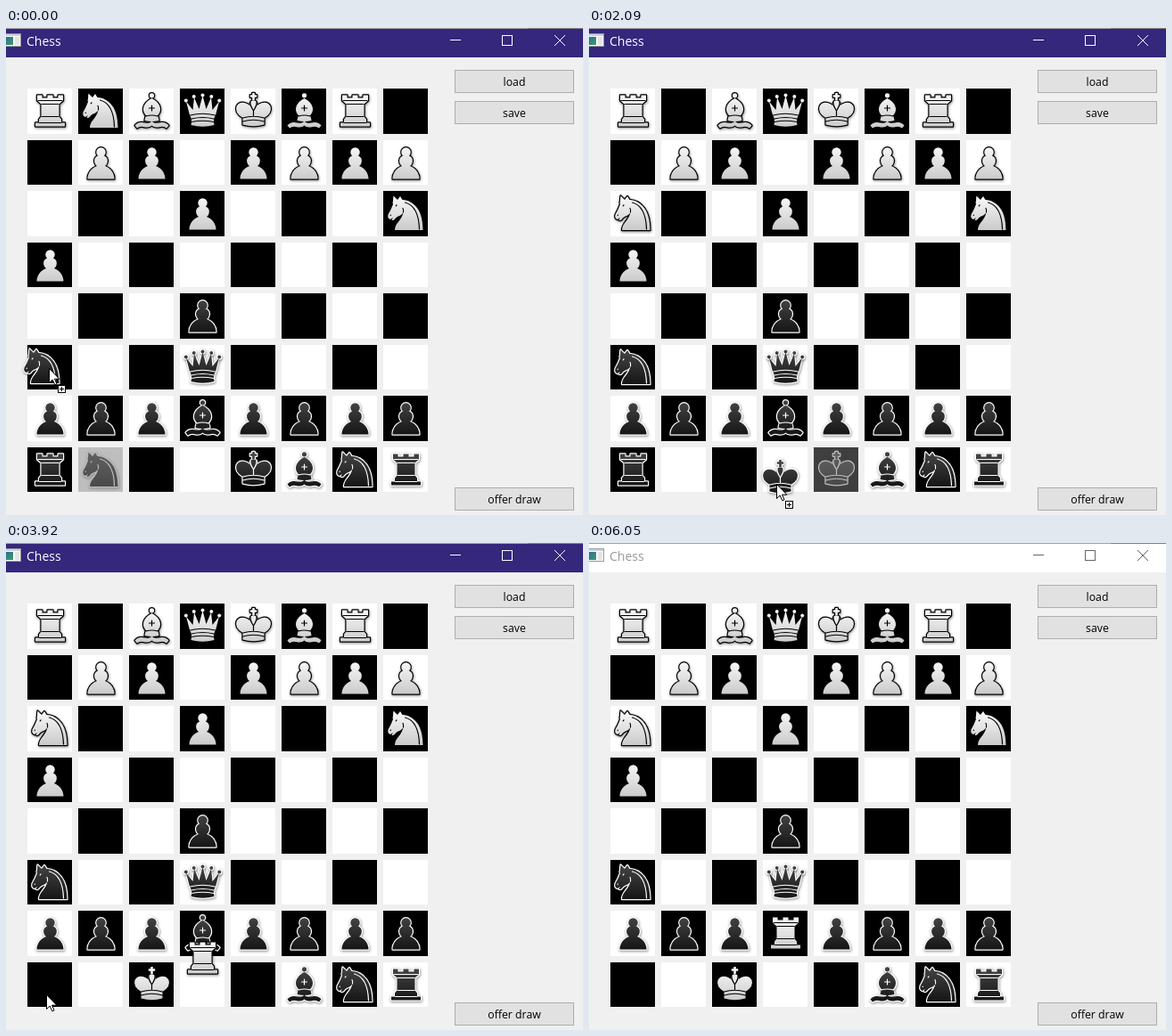
These frames come from a looping animation (647x547 px, 6.15 s). An HTML page with a canvas:

```html
<!DOCTYPE html>
<html lang="en">
<head>
<meta charset="utf-8">
<title>Chess</title>
<style>
  html, body { margin: 0; width: 100%; height: 100%; overflow: hidden; background: #f0f0f0; }
  canvas { display: block; }
</style>
</head>
<body>
<canvas id="stage" width="647" height="547"></canvas>
<script>
const ctx = document.getElementById('stage').getContext('2d');
const LOOP = 6150;

// Screen updates: time and, when the pointer moves, its new position.
const STEPS = [
  [0, 48, 382], [130, 49, 382], [380, 49, 381], [530], [680], [800, 53, 381],
  [950, 54, 392], [1080, 62, 435], [1200, 85, 501], [1350, 187, 488],
  [1510, 242, 478], [1660, 272, 506], [1940, 273, 503], [2090, 210, 512],
  [2220, 127, 518], [2370, 93, 507], [2510, 60, 508], [2630, 45, 508],
  [3440, 45, 507], [3560], [3680], [3800], [3920], [4080, 48, 507],
  [4220, 110, 505], [4340, 220, 503], [4470, 342, 505], [4610, 440, 501],
  [4730, 502, 506], [4890, 548, 530], [5030, 556, 541], [5160, -99, -99], [6050]
];

const START = [
  'R.BQKBR.', '.PP.PPPP', '...P...N', 'P.......',
  '...p....', '...q....', 'pppbpppp', 'r....bnr'
];

// Pieces in cell pixels: solid shapes and the lines drawn inside them.
const dot = (x, y, r) => `M${x - r} ${y}a${r} ${r} 0 1 0 ${2 * r} 0a${r} ${r} 0 1 0 ${-2 * r} 0z`;
const PIECES = {
  p: { solids: [
    dot(25.5, 13.5, 5.2),
    'M22 17.5C18.5 19 17.5 22 18.5 25.5Q19 27.5 21 29C15 31.5 10.5 36.5 10.5 43.5H40.5C40.5 36.5 36 31.5 30 29Q32 27.5 32.5 25.5C33.5 22 32.5 19 29 17.5z'
  ], lines: '' },
  r: { solids: [
    'M9 42.5V38.5H13V34.5L15.5 31.5V17.5L11 13.5V7.5H16.5V10.5H22.5V7.5H28.5V10.5H34.5V7.5H40V13.5L35.5 17.5V31.5L38 34.5V38.5H42V42.5z'
  ], lines: 'M12 13.5H39M16 17.5H35M16 31.5H35M13.5 38.5H37.5' },
  n: { solids: [
    'M13 44C13 36 21 33 22.5 24C21 28 15.5 28 13.5 31Q11.5 34 9.5 32.5L11 30L8 32Q4.5 31 5.5 26.5Q9 20.5 11 15Q10 13 11 11.5Q11 8 11.5 5.5L16 10L19 6L21.5 10C35 11 44.5 22 44.5 44z'
  ], lines: 'M24.5 13C34 15.5 40 25 40.5 43M22.5 24Q23 21 22 19.5M14.2 16.8l.8-.8M8.3 27v.4' },
  b: { solids: [
    'M25.5 36.5C23.5 39.5 19 39 14.5 38Q9.5 37.5 6.5 41.5L9 44.5Q12 42 16 43Q23 44.5 25.5 41.5Q28 44.5 35 43Q39 42 42 44.5L44.5 41.5Q41.5 37.5 36.5 38C32 39 27.5 39.5 25.5 36.5z',
    'M18.5 31H32.5L33.5 36Q25.5 38 17.5 36z',
    'M20 31C13.5 26 14.5 16.5 25.5 11C36.5 16.5 37.5 26 31 31z',
    dot(25.5, 7.8, 2.6)
  ], lines: 'M19 31Q25.5 29 32 31M25.5 19v6M22.5 22h6' },
  q: { solids: [
    'M11 30L7 14.5L14.5 24L16 10L21.5 23L25.5 8L29.5 23L35 10L36.5 24L44 14.5L40 30Q37 34 38.5 41Q25.5 44.5 12.5 41Q14 34 11 30z',
    dot(6.8, 13.5, 2), dot(15.7, 9, 2), dot(25.5, 7.5, 2), dot(35.3, 9, 2), dot(44.2, 13.5, 2)
  ], lines: 'M11.5 30Q25.5 26.5 39.5 30M13 34Q25.5 31 38 34M13 37.5Q25.5 35 38 37.5' },
  k: { solids: [
    'M24.2 5h2.6v2.3h2.4v2.4h-2.4v3.3h-2.6v-3.3h-2.4v-2.4h2.4z',
    'M25.5 28C22 23 20.5 18.5 22 15.5C23.5 12.5 27.5 12.5 29 15.5C30.5 18.5 29 23 25.5 28z',
    'M13.5 40.5Q25.5 44 37.5 40.5V33Q47 27 44.5 20C41.5 13.5 31.5 14 25.5 24.5C19.5 14 9.5 13.5 6.5 20Q4 27 13.5 33z'
  ], lines: 'M25.5 31V25C28 21 29.5 18 29 15.5M25.5 25C23 21 21.5 18 22 15.5M13.5 33Q25.5 29.5 37.5 33M13.5 37Q25.5 33.5 37.5 37' }
};
for (const piece of Object.values(PIECES)) {
  piece.solids = piece.solids.map(d => new Path2D(d));
  piece.lines = new Path2D(piece.lines);
}

function gradient(top, bottom) {
  const g = ctx.createLinearGradient(0, 8, 0, 44);
  g.addColorStop(0, top);
  g.addColorStop(1, bottom);
  return g;
}
const LIGHT = { fill: gradient('#f6f6f6', '#cacaca'), line: '#000' };
const DARK = { fill: gradient('#424242', '#151515'), line: '#fff' };

const ARROW = new Path2D('M.5.5V16.5L4.2 13 6.8 18.8 9 17.9 6.5 12.2H11.8Z');
const cellX = col => 24 + 57 * col;
const cellY = row => Math.round(68 + 57.57 * row);

function rect(x, y, w, h, fill, border) {
  ctx.fillStyle = fill;
  ctx.fillRect(x, y, w, h);
  if (border) {
    ctx.strokeStyle = border;
    ctx.lineWidth = 1;
    ctx.strokeRect(x + .5, y + .5, w - 1, h - 1);
  }
}

function text(str, x, y, size, color, align) {
  ctx.font = `${size}px "Open Sans", "Noto Sans", sans-serif`;
  ctx.textAlign = align;
  ctx.fillStyle = color;
  ctx.fillText(str, x, y);
}

// Upper case letters are light pieces; x, y is the corner of the piece's cell.
function drawPiece(letter, x, y) {
  const piece = PIECES[letter.toLowerCase()];
  const look = letter < 'a' ? LIGHT : DARK;
  ctx.save();
  ctx.translate(x, y);
  ctx.lineJoin = ctx.lineCap = 'round';
  ctx.strokeStyle = look.line;
  ctx.fillStyle = look.fill;
  ctx.save();
  ctx.shadowColor = 'rgba(0,0,0,.5)';
  ctx.shadowBlur = 3;
  ctx.shadowOffsetX = .5;
  ctx.shadowOffsetY = 1;
  ctx.lineWidth = 2.4;
  piece.solids.forEach(p => ctx.stroke(p));
  ctx.restore();
  piece.solids.forEach(p => ctx.fill(p));
  ctx.lineWidth = 1.2;
  ctx.stroke(piece.lines);
  ctx.restore();
}

function drawBoard() {
  for (let row = 0; row < 8; row++) {
    const y = cellY(row), height = Math.round(118.6 + 57.5 * row) - y;
    for (let col = 0; col < 8; col++) {
      rect(cellX(col), y, 50, height, (col + row) % 2 ? '#000' : '#fff');
    }
  }
}

// The cell a piece is dragged from stays visible under a grey veil.
function drawGhost(letter, col, row) {
  drawPiece(letter, cellX(col), cellY(row));
  rect(cellX(col), cellY(row), 50, 50, 'rgba(127,127,127,.5)');
}

function drawGlide(letter, from, to, progress) {
  const p = Math.min(1, Math.max(0, progress));
  const mix = (a, b) => Math.round(a + (b - a) * p);
  drawPiece(letter, mix(cellX(from[0]), cellX(to[0])), mix(cellY(from[1]), cellY(to[1])));
}

function drawTitleBar(active) {
  const ink = active ? '#fff' : '#666';
  rect(0, 0, 647, 33, active ? '#34277c' : '#fff');
  rect(0, 0, 647, 1, '#a2a2a2');
  rect(585, 0, 62, 1, '#808080');
  rect(-4, 6, 21, 15, '#fafafa', '#9a9a9a');
  rect(-4, 7, 20, 2, '#c9d3dc');
  const shade = ctx.createLinearGradient(0, 10, 8, 19);
  shade.addColorStop(0, '#2f6f9c');
  shade.addColorStop(1, '#3f9a63');
  rect(0, 10, 8, 9, shade);
  rect(10, 10, 5, 9, '#e4e4e4');
  text('Chess', 23, 20, 14, active ? '#fff' : '#999', 'left');
  rect(498, 13, 12, 1, ink);
  ctx.strokeStyle = ink;
  ctx.lineWidth = 1;
  ctx.strokeRect(556.5, 8.5, 11, 11);
  ctx.beginPath();
  ctx.moveTo(615, 8); ctx.lineTo(627, 20);
  ctx.moveTo(627, 8); ctx.lineTo(615, 20);
  ctx.stroke();
}

function drawButton(label, y, hover) {
  rect(503, y, 134, 26, hover ? '#e5f1fb' : '#e1e1e1', hover ? '#0078d7' : '#adadad');
  text(label, 570, y + 18, 12.3, '#000', 'center');
}

function drawPointer(x, y, dragging) {
  ctx.save();
  ctx.translate(x, y);
  ctx.fillStyle = '#fff';
  ctx.strokeStyle = '#000';
  ctx.lineWidth = 1;
  ctx.fill(ARROW);
  ctx.stroke(ARROW);
  if (dragging) {
    rect(10, 19, 9, 9, '#fff', '#000');
    rect(12, 23, 5, 1, '#000');
    rect(14, 21, 1, 5, '#000');
  }
  ctx.restore();
}

function render(time) {
  let t, x, y;
  for (const [at, px, py] of STEPS) {
    if (at > time) break;
    t = at;
    if (px !== undefined) [x, y] = [px, py];
  }
  const knightDrag = t < 380;
  const kingDrag = t >= 2090 && t < 3440;
  const castled = t >= 3440;
  const rookProgress = (t - 3430) / 960;

  rect(0, 0, 647, 547, '#f0f0f0');
  drawTitleBar(t < 6050);
  drawButton('load', 47);
  drawButton('save', 82);
  drawButton('offer draw', 516, t >= 4890 && t < 5160);

  drawBoard();
  START.forEach((line, row) => [...line].forEach((letter, col) => {
    const gone = (castled && row === 7 && col === 0) ||
      (rookProgress >= 1 && row === 6 && col === 3);
    if (letter !== '.' && !gone) drawPiece(letter, cellX(col), cellY(row));
  }));

  if (knightDrag) drawGhost('n', 1, 7);
  else drawPiece('n', cellX(0), cellY(5));
  if (kingDrag) drawGhost('k', 4, 7);
  else if (castled) drawPiece('K', cellX(2), cellY(7));
  else drawPiece('k', cellX(4), cellY(7));

  drawGlide('N', [1, 0], [0, 2], knightDrag ? 0 : (t - 305) / 960);
  if (castled) drawGlide('R', [3, 7], [3, 6], rookProgress);
  if (knightDrag) drawPiece('n', cellX(1) + x - 114, cellY(7) + y - 498);
  if (kingDrag) drawPiece('k', cellX(4) + x - 273, cellY(7) + y - 503);
  drawPointer(x, y, knightDrag || kingDrag);
}

const begin = performance.now();
function tick() {
  render((performance.now() - begin) % LOOP);
  requestAnimationFrame(tick);
}
tick();
</script>
</body>
</html>
```
